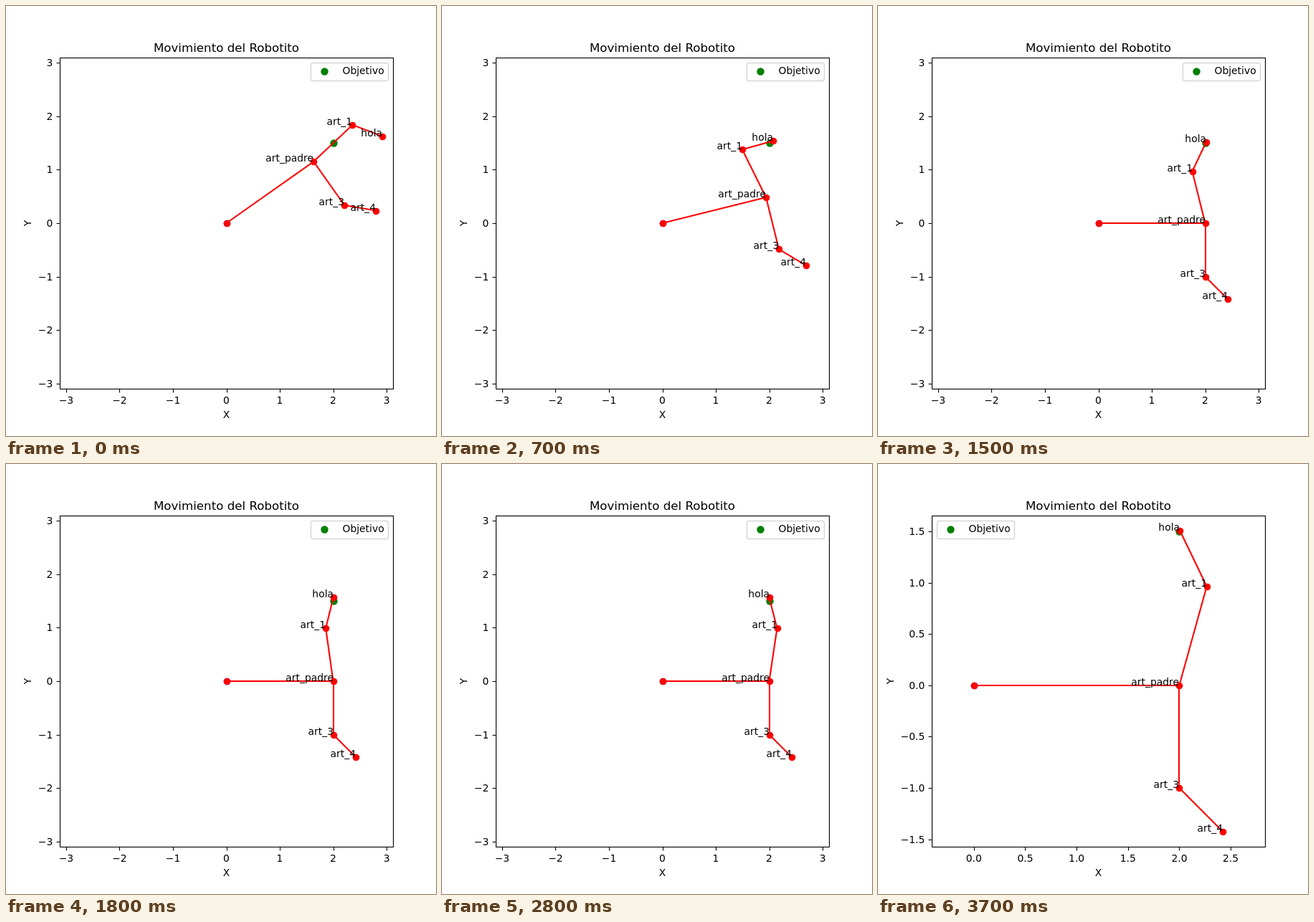
These frames come from a looping animation (600 by 600 pixels, 3800 ms). An HTML page with a canvas:

```html
<!DOCTYPE html>
<html lang="es">
<head>
<meta charset="utf-8">
<title>Movimiento del Robotito</title>
<style>
html, body { margin: 0; width: 100%; height: 100%; overflow: hidden; background: #fff; }
canvas { display: block; }
</style>
</head>
<body>
<canvas id="stage" width="600" height="600"></canvas>
<script>
const ctx = document.getElementById("stage").getContext("2d");
const FRAME = 100, COUNT = 38;
const RED = "#f00", GREEN = "#008000";

// step, then joint angles in degrees: shoulder, elbow, wrist
const KEYS = [
  [0, 35.2, 8.2, -64.3], [1, 40, 35, -55], [4, 21.8, 89.2, -118.8],
  [6, 16.4, 100, -108], [11, 4.8, 108.4, -70.8], [12, 3.2, 108, -63.5],
  [15, 0, 104, -39.4], [22, 0, 90, -1.3], [28, 0, 81.5, 22.8], [36, 0, 74.5, 41.2]
];

const WIDE = { x0: 307.5, y0: 303, unit: 462 / 6.2, from: -3, to: 3, step: 1, digits: 0, yLabel: 35, legend: 425 };
const CLOSE = { x0: 133.83, y0: 308.8, unit: 143.3, from: -1.5, to: 2.5, step: 0.5, digits: 1, yLabel: 22, legend: 82 };

const mid = n => Math.round(n) + 0.5;

function slope(i, j) {
  const a = KEYS[Math.max(i - 1, 0)], b = KEYS[Math.min(i + 1, KEYS.length - 1)];
  return (b[j] - a[j]) / (b[0] - a[0]);
}

// Cubic Hermite interpolation of the joint angles
function angles(n) {
  let i = 0;
  while (i < KEYS.length - 2 && n >= KEYS[i + 1][0]) i++;
  const p = KEYS[i], q = KEYS[i + 1], d = q[0] - p[0];
  const u = Math.min(1, (n - p[0]) / d), v = 1 - u;
  return [1, 2, 3].map(j =>
    v * v * (1 + 2 * u) * p[j] + u * u * (3 - 2 * u) * q[j] +
    u * v * d * (v * slope(i, j) - u * slope(i + 1, j)));
}

function text(s, x, y, align = "center", size = 13.89) {
  ctx.font = size + "px 'DejaVu Sans', sans-serif";
  ctx.textAlign = align;
  ctx.fillStyle = "#000";
  ctx.fillText(s, x, y);
}

// Dots sit on pixel centres
function dot(x, y, color, r = 4.86) {
  ctx.fillStyle = color;
  ctx.beginPath();
  ctx.arc(mid(x), mid(y), r, 0, 2 * Math.PI);
  ctx.fill();
}

function line(a, b, color, width) {
  ctx.strokeStyle = color;
  ctx.lineWidth = width;
  ctx.beginPath();
  ctx.moveTo(...a);
  ctx.lineTo(...b);
  ctx.stroke();
}

// Level and upright limbs snap to whole pixels
function limb(a, b) {
  const straight = a.some((n, i) => Math.abs(n - b[i]) < 1e-6);
  const snap = p => straight ? p.map(Math.round) : p;
  line(snap(a), snap(b), RED, 2.08);
}

function drawAxes(v) {
  for (let t = v.from; t <= v.to; t += v.step) {
    const label = t.toFixed(v.digits).replace("-", "\u2212");
    const x = v.x0 + t * v.unit, y = v.y0 - t * v.unit;
    if (x > 75) {
      line([mid(x), 535], [mid(x), 539.5], "#000", 1.11);
      text(label, x, 555);
    }
    if (y > 72) {
      line([70.5, mid(y)], [75, mid(y)], "#000", 1.11);
      text(label, 65.3, Math.round(y + 5), "right");
    }
  }
  ctx.lineWidth = 1.11;
  ctx.strokeRect(75.5, 72.5, 465, 462);
  text("Movimiento del Robotito", 307.5, 64, "center", 16.67);
  text("X", 307.5, 575);
  ctx.save();
  ctx.translate(v.yLabel, 303);
  ctx.rotate(-Math.PI / 2);
  text("Y", 0, 0);
  ctx.restore();
}

function drawLegend(x) {
  ctx.beginPath();
  ctx.roundRect(x + 0.5, 79.5, 108, 25, 2.8);
  ctx.fillStyle = "rgba(255,255,255,.8)";
  ctx.fill();
  ctx.strokeStyle = "rgba(204,204,204,.8)";
  ctx.lineWidth = 1.39;
  ctx.stroke();
  dot(x + 19, 91, GREEN, 5.2);
  text("Objetivo", x + 44.5, 95, "left");
}

function drawRobot(v, [a, b, c]) {
  const reach = (p, len, deg) => {
    const r = deg * Math.PI / 180, d = len * v.unit;
    return [p[0] + d * Math.cos(r), p[1] - d * Math.sin(r)];
  };
  const root = [v.x0, v.y0];
  const hub = reach(root, 2, a);
  const up = reach(hub, 1, a + b), tip = reach(up, 0.6, a + b + c);
  const down = reach(hub, 1, a - 90), end = reach(down, 0.6, a - 45);
  const joints = [[hub, "art_padre"], [up, "art_1"], [tip, "hola"], [down, "art_3"], [end, "art_4"]];

  dot(v.x0 + 2 * v.unit, v.y0 - 1.5 * v.unit, GREEN, 5.2);
  dot(...root, "#00f");
  for (const [p, q] of [[root, hub], [hub, up], [up, tip], [hub, down], [down, end]]) limb(p, q);
  for (const p of [root, ...joints.map(j => j[0])]) dot(...p, RED);
  for (const [[x, y], name] of joints) text(name, Math.round(x), Math.round(y), "right");
}

function draw(now) {
  const n = Math.floor(now / FRAME) % COUNT;
  const view = n === COUNT - 1 ? CLOSE : WIDE;
  const pose = angles(n);
  pose[0] = Math.max(0, pose[0]);
  ctx.fillStyle = "#fff";
  ctx.fillRect(0, 0, 600, 600);
  drawRobot(view, pose);
  drawAxes(view);
  drawLegend(view.legend);
}

let start;
function tick(now) {
  start ??= now;
  draw(now - start);
  requestAnimationFrame(tick);
}
requestAnimationFrame(tick);
</script>
</body>
</html>
```
